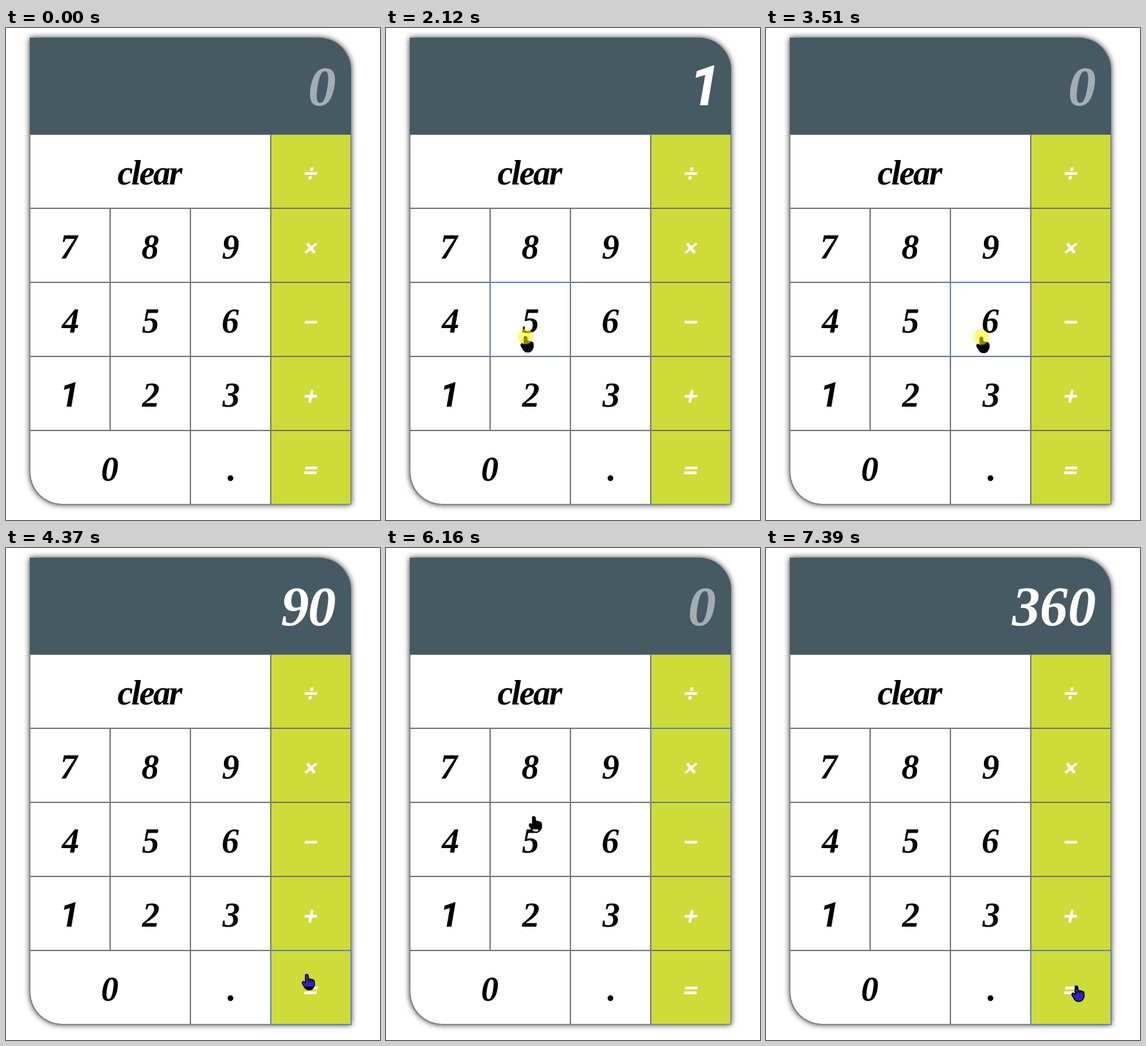
Write an HTML page with a canvas that moves like this. It is 582 px wide and 764 px high and loops after 8000 ms.

```html
<!DOCTYPE html>
<html lang="en">
<head>
<meta charset="utf-8">
<title>Calculator</title>
<style>
html, body { margin: 0; width: 100%; height: 100%; overflow: hidden; background: #fff; }
canvas { display: block; }
</style>
</head>
<body>
<canvas id="stage" width="582" height="764"></canvas>
<script>
const ctx = document.getElementById('stage').getContext('2d');
const LOOP = 8000, STEP = 77;
const LEFT = 37, TOP = 15, KEYS_TOP = 165, COL = 125, ROW = 115, RADIUS = 50;

// Repeated characters make one wide key.
const keys = ['ccc÷', '789×', '456−', '123+', '00.='].flatMap((line, row) =>
  [...new Set(line)].map(ch => ({
    label: ch === 'c' ? 'clear' : ch,
    x: LEFT + line.indexOf(ch) * COL,
    y: KEYS_TOP + row * ROW,
    w: (line.lastIndexOf(ch) - line.indexOf(ch) + 1) * COL,
    op: line.indexOf(ch) === 3
  })));

// Pointer trips: departure, press, release, key, x, y. The first only glides in.
const entry = { x: 396, y: 754 };
const trips = [
  [500, 970, 970, '', 169, 557],
  [1350, 1580, 1735, '1', 101, 570],
  [1735, 2120, 2200, '5', 217, 479],
  [2350, 2895, 3050, '×', 452, 345],
  [3210, 3510, 3680, '6', 335, 480],
  [3680, 4220, 4370, '=', 468, 662],
  [5150, 5760, 5930, '×', 450, 332],
  [5930, 6545, 6700, '4', 107, 464],
  [6770, 7235, 7390, '=', 483, 680]
].map(([start, down, up, key, x, y]) => ({ start, down, up, key, x, y }));

// The pointer moves in even jumps and slows down towards its goal.
function pointerAt(t) {
  const i = trips.findLastIndex(p => p.start <= t);
  const from = trips[i - 1] || entry, to = trips[i], span = to.down - to.start;
  const jumps = Math.round(span / STEP);
  const done = Math.floor((t - to.start) / span * jumps + .05) + 1;
  const e = Math.sin(Math.min(1, done / (jumps + 1)) * Math.PI / 2);
  return [from.x + (to.x - from.x) * e, from.y + (to.y - from.y) * e];
}

function valueAt(t) {
  let shown = '', left = '';
  for (const { key } of trips.filter(p => p.key && p.up <= t)) {
    if (key === '×') [left, shown] = [shown, ''];
    else if (key === '=') shown = String(left * shown);
    else shown += key;
  }
  return shown;
}

// Writes text with its ink aligned to x (0 left, .5 centre, 1 right); returns the ink width.
function write(text, x, y, size, align) {
  const face = text === '1' ? 'Roboto, sans-serif' : '"Liberation Serif", serif';
  ctx.font = `italic 700 ${size}px ${face}`;
  ctx.letterSpacing = -.045 * size + 'px';
  const m = ctx.measureText(text);
  const width = m.actualBoundingBoxRight + m.actualBoundingBoxLeft;
  ctx.fillText(text, x - width * align + m.actualBoundingBoxLeft, y);
  return width;
}

// Operators are slanted about the centre of their ink.
function writeOperator(text, x, y) {
  ctx.save();
  ctx.transform(1, 0, -.2, 1, x, y);
  ctx.font = '700 40px "Open Sans", sans-serif';
  ctx.letterSpacing = '0px';
  const m = ctx.measureText(text);
  ctx.fillText(text,
    (m.actualBoundingBoxLeft - m.actualBoundingBoxRight) / 2,
    (m.actualBoundingBoxAscent - m.actualBoundingBoxDescent) / 2);
  ctx.restore();
}

function drawDisplay(value) {
  ctx.fillStyle = value ? '#fff' : 'rgba(255,255,255,.5)';
  let right = 512;
  for (const digit of [...(value || '0')].reverse())
    right -= write(digit, right, 119.5, 87, 1) + 3;
}

function drawBody() {
  ctx.fillStyle = '#465a64';
  ctx.shadowColor = 'rgba(0,0,0,.85)';
  ctx.shadowBlur = 10;
  ctx.beginPath();
  ctx.roundRect(LEFT, TOP, 4 * COL, KEYS_TOP - TOP + 5 * ROW, [0, RADIUS, 0, RADIUS]);
  ctx.fill();
  ctx.shadowBlur = 0;
}

// Later keys cover the part of a focus ring that reaches into them.
function drawKey({ label, x, y, w, op }, focused) {
  ctx.beginPath();
  ctx.roundRect(x + .5, y + .5, w - 1, ROW - 1, [0, 0, 0, label === '0' ? RADIUS : 0]);
  ctx.fillStyle = op ? '#cddc39' : '#fff';
  ctx.fill();
  ctx.strokeStyle = '#767676';
  ctx.lineWidth = 1;
  ctx.stroke();
  ctx.fillStyle = op ? '#fff' : '#000';
  if (op) writeOperator(label, x + w / 2, y + 61.5);
  else write(label, x + w / 2, y + 77.5, 54, .5);
  if (focused) {
    ctx.strokeStyle = 'rgba(92,135,205,.85)';
    ctx.lineWidth = 2;
    ctx.strokeRect(x, y, w, ROW);
  }
}

const hand = new Path2D('M-2 1Q0-1 2 1L3 7 8 8Q12 8.5 12 12V17L10 21Q8 24 4 24H1Q-3 22-4 19L-7 14Q-7 11-5 11L-2 13Z');
const knuckles = new Path2D('M2.5 7V12M5.5 8V12M8.5 9V12');

// The hand inverts whatever lies beneath it.
function drawPointer(x, y, pressed) {
  ctx.save();
  ctx.translate(Math.round(x), Math.round(y));
  ctx.globalCompositeOperation = 'difference';
  ctx.fillStyle = '#fff';
  ctx.fill(hand);
  ctx.globalCompositeOperation = 'source-over';
  ctx.strokeStyle = '#000';
  ctx.lineWidth = 1.5;
  ctx.stroke(hand);
  ctx.lineWidth = 1;
  ctx.stroke(knuckles);
  if (pressed) {
    ctx.fillStyle = 'rgba(255,250,0,.55)';
    ctx.beginPath();
    ctx.arc(0, 0, 12, 0, 2 * Math.PI);
    ctx.fill();
  }
  ctx.restore();
}

function draw(now) {
  const t = now % LOOP;
  const press = trips.findLast(p => p.down <= t);
  ctx.fillStyle = '#fff';
  ctx.fillRect(0, 0, 582, 764);
  drawBody();
  drawDisplay(valueAt(t));
  for (const key of keys) drawKey(key, press && key.label === press.key);
  if (t >= trips[0].start) drawPointer(...pointerAt(t), press && t < press.up);
  requestAnimationFrame(draw);
}
requestAnimationFrame(draw);
</script>
</body>
</html>
```
